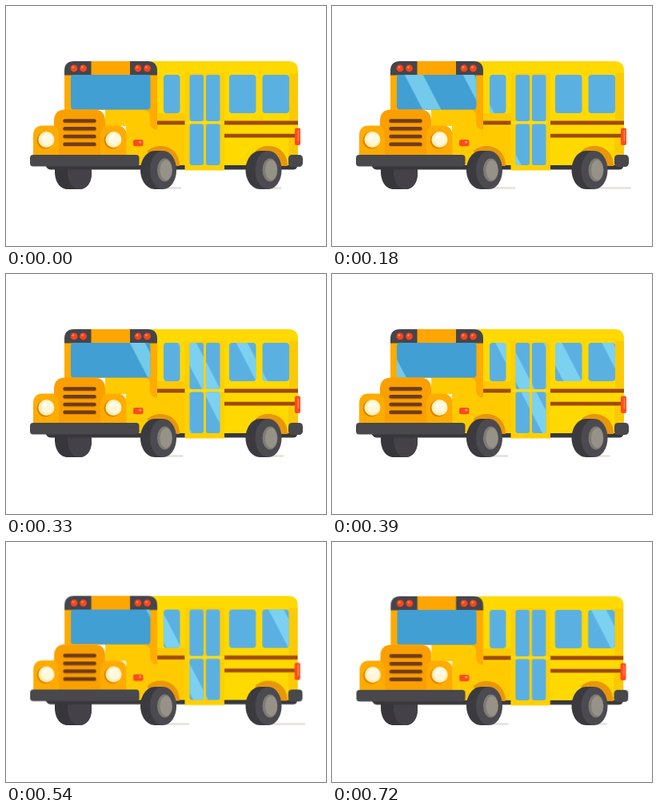
Recreate the animation shown at these times as an HTML page. Size 400 px wide and 300 px high, loop 0.75 s.

```html
<!DOCTYPE html>
<html lang="en">
<head>
<meta charset="utf-8">
<title>School bus</title>
<style>
html, body { margin: 0; width: 100%; height: 100%; overflow: hidden; background: #fff; }
svg { display: block; width: 400px; height: 300px; }

.body { transform-origin: 197px 200px; animation: hop 750ms linear infinite; }
.glints { animation: sweep 750ms linear infinite; }
.dash { height: 2.6px; fill: #e7e2dc; }
.front { animation: front 375ms linear infinite; }
.rear { animation: rear 375ms linear infinite; }

@keyframes hop {
  0%, 64%, 100% { transform: none; }
  68% { transform: translateY(.2px) scaleX(1.003); }
  72% { transform: translateY(-1.6px) scaleX(.999); }
  80% { transform: translateY(-2.8px) scaleX(.993); }
  84% { transform: translateY(-3.3px) scaleX(.993); }
  96% { transform: translateY(-1.2px) scaleX(.997); }
}
@keyframes sweep {
  to { transform: translateX(620px); }
}
@keyframes front {
  0% { width: 24px; }
  20% { width: 30px; }
  32% { width: 33px; }
  60% { width: 35px; }
  72% { width: 39px; }
  88% { width: 26px; }
  100% { width: 24px; }
}
@keyframes rear {
  0% { width: 19px; }
  20% { width: 35px; }
  46% { width: 50px; }
  72% { width: 35px; }
  92% { width: 19px; }
  96% { width: 18px; }
  100% { width: 19px; }
}
</style>
</head>
<body>
<svg viewBox="0 0 400 300">
  <defs>
    <clipPath id="panes">
      <rect x="81" y="86" width="99.5" height="43.5" rx="4"/>
      <rect x="197" y="86" width="20.5" height="48" rx="4"/>
      <rect x="229.5" y="86" width="17.5" height="58" rx="3"/>
      <rect x="250" y="86" width="17.5" height="58" rx="3"/>
      <rect x="229.5" y="147.5" width="17.5" height="51.5" rx="3"/>
      <rect x="250" y="147.5" width="17.5" height="51.5" rx="3"/>
      <rect x="279" y="86" width="33.5" height="48" rx="4"/>
      <rect x="320.5" y="86" width="33.5" height="48" rx="4"/>
    </clipPath>
    <g id="wheel">
      <path d="M186 181H196V229H186C176 229 168 218 168 205S176 181 186 181Z" fill="#3b3a3f"/>
      <ellipse cx="196.5" cy="205" rx="16.5" ry="24" fill="#4b4a50"/>
      <ellipse cx="198.5" cy="205" rx="9.5" ry="14.5" fill="#7f7c74"/>
      <ellipse cx="200" cy="205" rx="7.5" ry="12.5" fill="#969288"/>
    </g>
    <path id="arch" d="M177 181C183 176 188 175 193 175C207 175 217 185 217 200H178Z" fill="#e8960a"/>
    <g id="lamp">
      <circle r="4.4" fill="#ff4419"/>
      <circle cx="-1" cy="-1.2" r="1.4" fill="#ff8a63"/>
    </g>
    <g id="headlight">
      <circle cx="-1.5" cy="1" r="10.5" fill="#dd8505"/>
      <circle r="10" fill="#fff0b8"/>
      <circle cx="1.2" cy="-1" r="7.5" fill="#fff8dc"/>
      <circle cx="-2" cy="-3" r="2.4" fill="#fff"/>
    </g>
    <g id="slot" stroke-linecap="round" stroke-width="4.4">
      <path d="M73.5 1.2H111" stroke="#e08a08"/>
      <path d="M73.5 0H110.5" stroke="#713b1c"/>
    </g>
  </defs>

  <rect class="dash front" x="195" y="226.2"/>
  <rect class="dash rear" x="325" y="226.2"/>

  <path d="M61 198H107V209C107 221 101 229 92 229H77C67 229 61 219 61 207Z" fill="#37363b"/>
  <path d="M77 198H107V209C107 221 101 229 92 229C82 229 77 219 77 207Z" fill="#454149"/>

  <g class="body">
    <path d="M49 197H364V201Q363 204.5 359 204.5H55Q50 204 49 197Z" fill="#38383c"/>

    <path d="M150 69H353Q365 69 365 81V199H150Z" fill="#ffd900"/>
    <path d="M354 84H365V143H354ZM189 134H224V143.5H189Z" fill="#fcca05"/>
    <path d="M124 129H189V150H224V199H150V150H124Z" fill="#ffcb00"/>
    <path d="M353 165H365V199H353Z" fill="#fcca05"/>
    <path d="M189 143.5H224V148.5H189ZM273 143.5H365V148.5H273ZM273 159.7H365V164.5H273Z" fill="#a04a08"/>

    <path d="M73 82H189V155Q180 154 180 145V138Q180 130 172 130H73Z" fill="#ffab00"/>
    <path d="M106 69H156V86H106Z" fill="#ffa600"/>
    <path d="M73 86.5V81Q73 69 85 69H106.5V86.5Z" fill="#45464b"/>
    <path d="M155 86.5V69H177Q189 69 189 81V86.5Z" fill="#45464b"/>
    <use href="#lamp" x="85" y="77.8"/>
    <use href="#lamp" x="96.5" y="77.8"/>
    <use href="#lamp" x="165" y="77.8"/>
    <use href="#lamp" x="176.5" y="77.8"/>

    <path d="M223.5 84H273V205.5H223.5Z" fill="#ffd000"/>
    <path d="M224 144.2H273V147.3H224Z" fill="#ffdc1c"/>

    <g clip-path="url(#panes)">
      <path d="M70 80H190V210H70Z" fill="#429fd3"/>
      <path d="M190 80H365V210H190Z" fill="#5bb0e2"/>
      <g class="glints" fill="#91e5f8" fill-opacity=".62">
        <path d="M14 86h14l60 115h-14z"/>
        <path d="M-119 86h19l60 115h-19z"/>
        <path d="M-59 86h23l60 115h-23z"/>
        <path d="M-272 86h19l60 115h-19z"/>
      </g>
    </g>

    <path d="M60 150V144Q60 129.5 74 129.5H110Q124 129.5 124 144V150Z" fill="#f9a000"/>
    <path d="M34 187V162Q34 149.5 46 149.5H138Q150.5 149.5 150.5 162V187Z" fill="#ffab00"/>
    <path d="M60 148Q66 154 66 164V187H118V164Q118 154 124 148Z" fill="#f9a000"/>
    <use href="#slot" y="143.5"/>
    <use href="#slot" y="153.3"/>
    <use href="#slot" y="163"/>
    <use href="#slot" y="172.7"/>
    <use href="#headlight" x="50.5" y="167"/>
    <use href="#headlight" x="134.5" y="167"/>

    <rect x="159" y="167" width="12.5" height="8.2" rx="2.5" fill="#ff4a1c"/>
    <rect x="166" y="168.5" width="3.5" height="3" rx="1.5" fill="#ff9a75"/>

    <use href="#arch"/>
    <use href="#arch" x="135"/>

    <rect x="30" y="186" width="136.5" height="14.5" rx="4" fill="#48484d"/>
    <rect x="353" y="186" width="18" height="15" rx="4.5" fill="#48484d"/>
    <rect x="361" y="152.5" width="7" height="21.5" rx="2" fill="#ff4a1c"/>
    <rect x="364.5" y="155" width="2" height="14" rx="1" fill="#ff8050"/>
  </g>

  <use href="#wheel"/>
  <use href="#wheel" x="131.5"/>
</svg>
</body>
</html>
```
